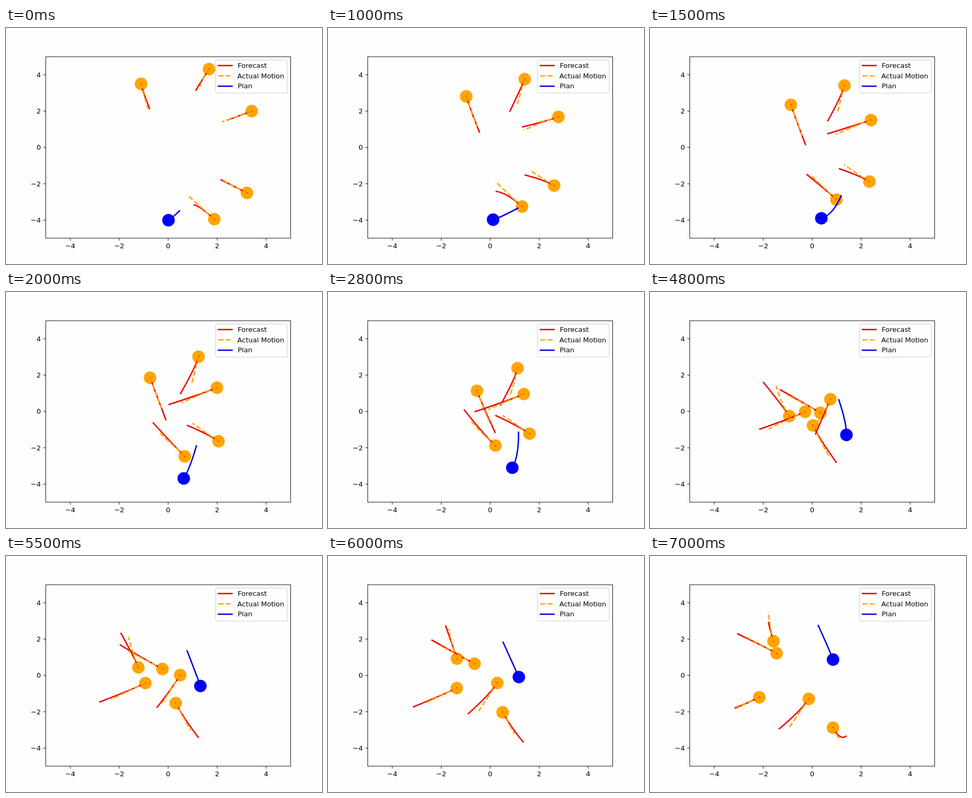
Write an HTML page with a canvas that moves like this. It is 600 by 450 pixels and loops after 7.3 s.

```html
<!DOCTYPE html>
<html lang="en">
<head>
<meta charset="utf-8">
<title>Forecast and plan</title>
<style>
  html, body { margin: 0; width: 100%; height: 100%; overflow: hidden; background: #fefefe; }
  svg, canvas { position: absolute; left: 0; top: 0; width: 600px; height: 450px; }
  text { font: 13.02px "DejaVu Sans", sans-serif; fill: #000; }
</style>
</head>
<body>
<canvas id="stage" width="600" height="450"></canvas>
<svg viewBox="0 0 600 450">
  <g id="axes" fill="none" stroke="#000" stroke-width=".94">
    <rect x="75.47" y="54.84" width="465" height="345.94"/>
  </g>
  <g id="labels"></g>
  <rect x="398" y="61" width="136" height="63" rx="2.6" fill="#fefefe" fill-opacity=".8" stroke="#ccc"/>
  <g fill="none" stroke-width="2.6">
    <path d="M403.2 71.6h26" stroke="#f00000" stroke-linecap="square"/>
    <path d="M403.2 91.3h26" stroke="#ffa500" stroke-dasharray="9.64 4.17"/>
    <path d="M403.2 111h26" stroke="#0000e6" stroke-linecap="square"/>
  </g>
  <text x="440" y="76.2">Forecast</text>
  <text x="439.3" y="95.8">Actual Motion</text>
  <text x="440" y="115.4">Plan</text>
</svg>
<script>
const ORANGE = '#ffa500', RED = '#f00000', BLUE = '#0000e6';
const LOOP = 7300, AHEAD = 7, RADIUS = 11.9;

// Key steps for the walked path and for the end of the predicted curve.
const PATH_STEPS = [0, 4, 8, 19, 28, 35];
const GOAL_STEPS = [0, 4, 8, 19, 24, 28];

const people = [
  { path: [[256, 106], [262, 130], [273, 163], [309, 254], [347, 327], [358, 347]],
    goal: [[272, 153], [287, 198], [303, 243], [353, 324], [370, 354], [372, 343]] },
  { path: [[385, 78], [373, 97], [365, 123], [342, 204], [301, 272], [264, 326]],
    goal: [[360, 118], [345, 158], [331, 193], [314, 270], [266, 300], [245, 329]] },
  { path: [[466, 158], [437, 169], [400, 182], [294, 228], [207, 269], [161, 291]],
    goal: [[420, 175], [369, 188], [309, 214], [208, 261], [162, 287], [161, 289]] },
  { path: [[457, 314], [429, 300], [403, 284], [323, 230], [240, 185], [178, 152]],
    goal: [[408, 289], [374, 280], [344, 254], [247, 186], [197, 160], [166, 148]] },
  { path: [[395, 364], [368, 340], [339, 313], [264, 236], [234, 162], [224, 107]],
    goal: [[357, 337], [319, 311], [279, 249], [215, 172], [223, 133], [225, 126]] }
];

const robot = {
  path: [[308, 366], [313, 365], [337, 355], [372.5, 272], [347, 197], [324, 144]],
  goal: [[329, 348], [360, 343], [361, 293], [358, 205], [332, 164], [319, 132]]
};

// Smooth point at step k through the points given at the key steps.
function track(steps, points, k) {
  const last = steps.length - 1;
  let i = 0;
  while (i < last - 1 && k >= steps[i + 1]) i++;
  const h = steps[i + 1] - steps[i], u = (k - steps[i]) / h;
  const u2 = u * u, u3 = u2 * u;
  return [0, 1].map(c => {
    const slope = j => {
      const a = Math.max(j - 1, 0), b = Math.min(j + 1, last);
      return (points[b][c] - points[a][c]) / (steps[b] - steps[a]);
    };
    return (2 * u3 - 3 * u2 + 1) * points[i][c] + (u3 - 2 * u2 + u) * h * slope(i)
         + (3 * u2 - 2 * u3) * points[i + 1][c] + (u3 - u2) * h * slope(i + 1);
  });
}

const place = (body, k) => track(PATH_STEPS, body.path, k);

const ctx = document.getElementById('stage').getContext('2d');
ctx.lineWidth = 2.6;
ctx.lineJoin = 'round';
ctx.translate(.5, .5);

function drawBody(body, k, color) {
  ctx.fillStyle = color;
  ctx.beginPath();
  ctx.arc(...place(body, k), RADIUS, 0, 2 * Math.PI);
  ctx.fill();
}

// Leaves along the current velocity and bends to the goal;
// the nearer the goal for that speed, the later the turn.
function drawPrediction(body, k, color) {
  const [x, y] = place(body, k), [nx, ny] = place(body, k + .5);
  const [gx, gy] = track(GOAL_STEPS, body.goal, k);
  const vx = 2 * (nx - x), vy = 2 * (ny - y);
  const covered = Math.hypot(gx - x, gy - y) / (AHEAD * Math.hypot(vx, vy));
  const reach = AHEAD * (1 - Math.min(covered, 1.2) / 2);
  ctx.strokeStyle = color;
  ctx.lineCap = 'square';
  ctx.setLineDash([]);
  ctx.beginPath();
  ctx.moveTo(x, y);
  ctx.quadraticCurveTo(x + vx * reach, y + vy * reach, gx, gy);
  ctx.stroke();
}

function drawActual(body, k) {
  ctx.strokeStyle = ORANGE;
  ctx.lineCap = 'butt';
  ctx.setLineDash([9.64, 4.17]);
  ctx.beginPath();
  for (let n = 0; n <= AHEAD; n++) ctx.lineTo(...place(body, k + n));
  ctx.stroke();
}

function draw(k) {
  ctx.clearRect(-1, -1, 602, 452);
  people.forEach(p => drawBody(p, k, ORANGE));
  drawBody(robot, k, '#00f');
  for (const p of people) {
    drawPrediction(p, k, RED);
    drawActual(p, k);
  }
  drawPrediction(robot, k, BLUE);
}

function addTicks() {
  let marks = '', labels = '';
  for (let v = -4; v <= 4; v += 2) {
    const x = 307.97 + 46.5 * v, y = 227.7 - 34.65 * v;
    const name = String(v).replace('-', '\u2212');
    marks += `M${x} 400.8v4.56M75.47 ${y}h-4.56`;
    labels += `<text x="${x}" y="419.8" text-anchor="middle">${name}</text>`
            + `<text x="66.3" y="${y + 4.5}" text-anchor="end">${name}</text>`;
  }
  document.getElementById('axes').innerHTML += `<path d="${marks}"/>`;
  document.getElementById('labels').innerHTML = labels;
}

// Steps alternate between 300 ms and 200 ms.
function stepAt(ms) {
  const t = ms % LOOP;
  return 2 * Math.floor(t / 500) + (t % 500 >= 300 ? 1 : 0);
}

let shown = -1;
const start = performance.now();
function tick() {
  const k = stepAt(performance.now() - start);
  if (k !== shown) draw(shown = k);
  requestAnimationFrame(tick);
}
addTicks();
tick();
</script>
</body>
</html>
```
